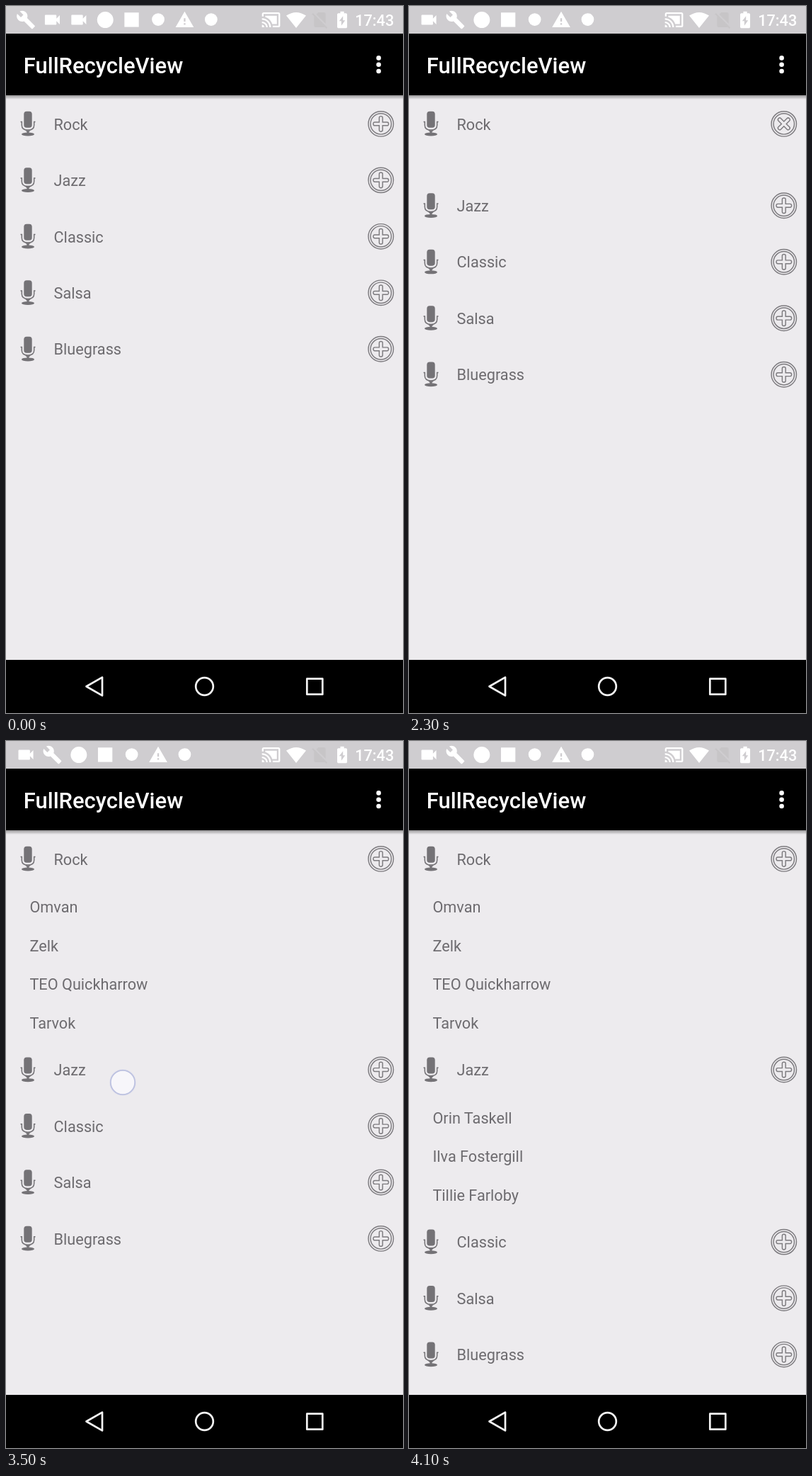
Write an HTML page that moves like this. It is 561 by 998 pixels and loops after 5.1 s.

```html
<!DOCTYPE html>
<html lang="en">
<head>
<meta charset="utf-8">
<title>Expandable list</title>
<style>
  html, body { margin: 0; width: 100%; height: 100%; overflow: hidden; background: #edebee; }
  svg { display: block; width: 100%; height: 100%; }
  text { font-family: Roboto, sans-serif; font-size: 21.7px; fill: #6d6b6f; }
  .title { font-size: 31px; font-weight: 500; fill: #fff; }
  .clock { font-weight: 500; fill: #fff; }
  .line { fill: none; stroke: #7d7b7f; stroke-width: 1.45; }
  .nav { fill: none; stroke: #f4f4f4; stroke-width: 2.7; stroke-linejoin: round; }
</style>
</head>
<body>
<svg viewBox="0 0 561 998">
  <defs>
    <linearGradient id="shade" x2="0" y2="1">
      <stop offset="0" stop-color="#000" stop-opacity=".36"/>
      <stop offset="1" stop-color="#000" stop-opacity="0"/>
    </linearGradient>
    <g id="mic" fill="#747276">
      <rect x="25.3" y="-17.6" width="11.4" height="23" rx="3.8"/>
      <path d="M20.5-2.8h1.8v4.6c0 4.8 4 6.9 8.7 6.9s8.7-2.1 8.7-6.9v-4.6h1.8" fill="none" stroke="#747276" stroke-width="1.5"/>
      <path d="M27 9h8l-2.5 2.2v2h-3v-2z"/>
      <ellipse cx="31" cy="14.6" rx="9" ry="2.5"/>
    </g>
    <g id="plus" class="line">
      <circle r="17.7"/>
      <circle r="14.7"/>
      <path d="M-2.4-2.4V-8.7q0-2.1 2.4-2.1t2.4 2.1V-2.4H8.7q2.1 0 2.1 2.4t-2.1 2.4H2.4V8.7q0 2.1-2.4 2.1t-2.4-2.1V2.4H-8.7q-2.1 0-2.1-2.4t2.1-2.4z"/>
    </g>
    <path id="cam" d="M17 10.5V7c0-.55-.45-1-1-1H4c-.55 0-1 .45-1 1v10c0 .55.45 1 1 1h12c.55 0 1-.45 1-1v-3.5l4 4v-11l-4 4z"/>
    <path id="wrench" d="M22.7 19l-9.1-9.1c.9-2.3.4-5-1.5-6.9-2-2-5-2.4-7.4-1.3L9 6 6 9 1.6 4.7C.4 7.1.9 10.1 2.9 12.1c1.9 1.9 4.6 2.4 6.9 1.5l9.1 9.1c.4.4 1 .4 1.4 0l2.3-2.3c.5-.4.5-1.1.1-1.4z"/>
    <path id="warn" d="M1 21h22L12 2 1 21zm12-3h-2v-2h2v2zm0-4h-2v-4h2v4z"/>
    <circle id="disc" cx="12" cy="12" r="9.8"/>
    <circle id="dot" cx="12" cy="11.6" r="7.6"/>
    <rect id="square" x="3.2" y="3.2" width="17.4" height="17.4"/>
    <path id="cast" d="M1 18v3h3c0-1.66-1.34-3-3-3zm0-4v2c2.76 0 5 2.24 5 5h2c0-3.87-3.13-7-7-7zm18-7H5v1.63c3.96 1.28 7.09 4.41 8.37 8.37H19V7zM1 10v2c4.97 0 9 4.03 9 9h2c0-6.08-4.93-11-11-11zm20-7H3c-1.1 0-2 .9-2 2v3h2V5h18v14h-7v2h7c1.1 0 2-.9 2-2V5c0-1.1-.9-2-2-2z"/>
    <path id="nosim" fill="#c7c5c7" d="M18.99 5c0-1.1-.89-2-1.99-2h-7L7.66 5.34 19 16.68 18.99 5zM3.65 3.88L2.38 5.15 5 7.77V19c0 1.1.9 2 2 2h10.01c.35 0 .67-.1.96-.26l1.88 1.88 1.27-1.27L3.65 3.88z"/>
    <path id="battery" d="M16.2 4H14.2V2H9.8v2H7.8C6.8 4 6 4.6 6 5.33v15.33C6 21.4 6.8 22 7.8 22h8.4c1 0 1.8-.6 1.8-1.33V5.33C18 4.6 17.2 4 16.2 4zM11 19v-5.5H8.4L13 7.5v5h2.6L11 19z"/>
  </defs>

  <rect width="561" height="998" fill="#edebee"/>
  <g id="list"></g>
  <g id="touch">
    <circle r="19" fill="#dfe0ee" opacity=".5"/>
    <circle r="17.2" fill="#f7f6fa" stroke="#bcc1e0" stroke-width="1.8"/>
  </g>

  <rect width="561" height="39" fill="#cfcdd0"/>
  <g id="status" fill="#fff">
    <g id="before"></g>
    <g id="after"></g>
    <path d="M396 13.6Q410 4.2 424 13.6L410 31z"/>
  </g>
  <text class="clock" x="493.2" y="27.8">17:43</text>

  <rect y="39" width="561" height="87" fill="#000"/>
  <rect y="126" width="561" height="6" fill="url(#shade)"/>
  <text class="title" x="24.8" y="95">FullRecycleView</text>
  <g fill="#fff">
    <circle cx="526.6" cy="73.4" r="3.3"/>
    <circle cx="526.6" cy="82.7" r="3.3"/>
    <circle cx="526.6" cy="92" r="3.3"/>
  </g>

  <rect y="923" width="561" height="75" fill="#000"/>
  <g class="nav">
    <path d="M113.5 960.5L136 947.6V973.4z"/>
    <circle cx="280.5" cy="960.5" r="12.3"/>
    <rect x="425.3" y="949.7" width="22" height="22"/>
  </g>
</svg>
<script>
const LOOP = 5100, STEP = 100;
const ROW = 79.47, CHILD = 54.54, TOP = 166.4;
const MOVE = 250, FADE = 120, SPIN = 300;

const genres = [
  { name: "Rock", items: ["Omvan", "Zelk", "TEO Quickharrow", "Tarvok"], move: 2233.5, spin: 2200 },
  { name: "Jazz", items: ["Orin Taskell", "Ilva Fostergill", "Tillie Farloby"], move: 3700, spin: 3680 },
  { name: "Classic" }, { name: "Salsa" }, { name: "Bluegrass" }
];
const taps = [
  { from: 2000, to: 2200, x: 141.5, y: 194.5 },
  { from: 3500, to: 3700, x: 165, y: 482 }
];

const $ = id => document.getElementById(id);

function add(parent, tag, attrs, text) {
  const el = document.createElementNS("http://www.w3.org/2000/svg", tag);
  for (const key in attrs) el.setAttribute(key, attrs[key]);
  if (text) el.textContent = text;
  return parent.appendChild(el);
}

const icon = (parent, name, x) =>
  add(parent, "use", { href: "#" + name, transform: `translate(${x - 14} 5.5) scale(1.17)` });

const iconRow = (parent, names) =>
  names.split(" ").forEach((name, i) => icon(parent, name, 28 + 37.4 * i));

iconRow($("before"), "wrench cam cam disc square dot warn dot");
iconRow($("after"), "cam wrench disc square dot warn dot");
icon($("status"), "cast", 374.5);
icon($("status"), "nosim", 443.5);
icon($("status"), "battery", 475);

for (const genre of genres) {
  genre.row = add($("list"), "g");
  add(genre.row, "use", { href: "#mic" });
  add(genre.row, "text", { x: 67.5, y: 8.2 }, genre.name);
  genre.plus = add(genre.row, "use", { href: "#plus" });
  genre.kids = add(genre.row, "g");
  (genre.items || []).forEach((item, i) =>
    add(genre.kids, "text", { x: 33.4, y: 75.6 + CHILD * i }, item));
}

// Accelerate, then decelerate, between start and start + length.
function ease(t, start, length) {
  const p = Math.min(1, Math.max(0, (t - start) / length));
  return (1 - Math.cos(Math.PI * p)) / 2;
}

function draw(t) {
  $("before").style.display = t < 300 ? "" : "none";
  $("after").style.display = t < 300 ? "none" : "";

  let y = TOP;
  for (const { row, plus, kids, items, move, spin } of genres) {
    row.setAttribute("transform", `translate(0 ${y})`);
    const turn = items ? -180 * ease(t, spin, SPIN) : 0;
    plus.setAttribute("transform", `translate(529.8 0) rotate(${turn})`);
    y += ROW;
    if (!items) continue;
    kids.setAttribute("opacity", ease(t, move + MOVE, FADE));
    y += CHILD * items.length * ease(t, move, MOVE);
  }

  const tap = taps.find(p => t >= p.from && t < p.to);
  $("touch").style.display = tap ? "" : "none";
  if (tap) $("touch").setAttribute("transform", `translate(${tap.x} ${tap.y})`);
}

const begin = performance.now();
function tick() {
  const t = (performance.now() - begin) % LOOP;
  draw(Math.floor(t / STEP) * STEP);
  requestAnimationFrame(tick);
}
tick();
</script>
</body>
</html>
```
